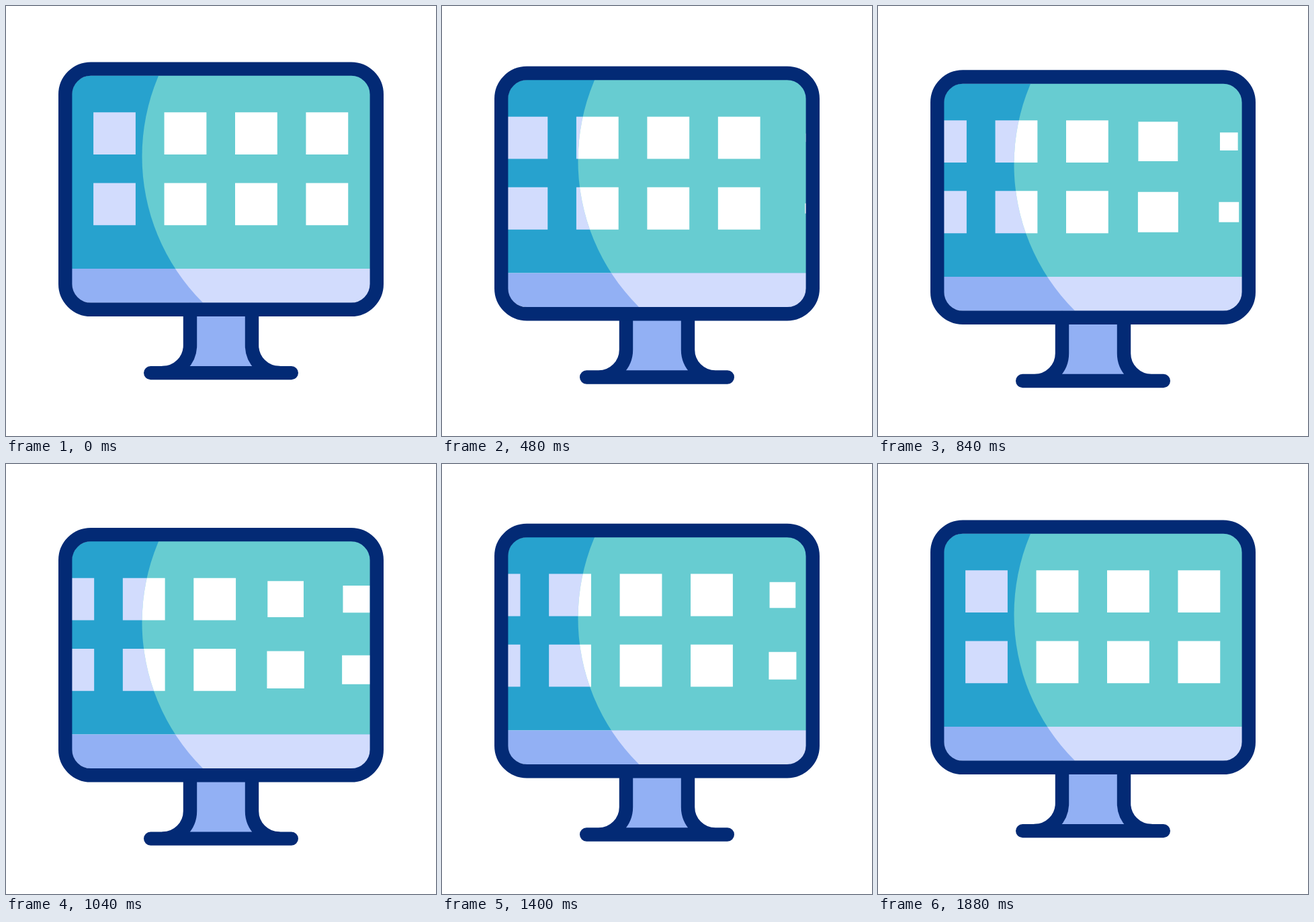
Recreate the animation shown at these times as an HTML page. Size 640 px wide and 640 px high, loop 2 s.

```html
<!DOCTYPE html>
<html lang="en">
<head>
<meta charset="utf-8">
<title>Scrolling monitor</title>
<style>
  html, body { margin: 0; width: 100%; height: 100%; overflow: hidden; background: #fff; }
  svg { display: block; width: 100%; height: 100%; }
</style>
</head>
<body>
<svg viewBox="0 0 640 640">
  <defs>
    <clipPath id="screen"><rect x="98" y="103.5" width="444" height="338.3" rx="28"/></clipPath>
    <clipPath id="shine"><circle cx="509" cy="224" r="306.5"/></clipPath>
    <path id="tiles"/>
  </defs>
  <g id="monitor">
    <path fill="#92b0f4" d="M274 452V505Q274 530 262 546H378Q366 530 366 505V452Z"/>
    <path fill="none" stroke="#032a75" stroke-width="20.4" stroke-linecap="round"
      d="M274 452V505a41 41 0 0 1-41 41M366 452V505a41 41 0 0 0 41 41M215.2 546.1H424.8"/>
    <g clip-path="url(#screen)">
      <path fill="#27a2ce" d="M90 95H550V391H90Z"/>
      <path fill="#92b0f4" d="M90 391H550V450H90Z"/>
      <use href="#tiles" fill="#d2dcfd"/>
      <g clip-path="url(#shine)">
        <path fill="#67ccd1" d="M90 95H550V391H90Z"/>
        <path fill="#d2dcfd" d="M90 391H550V450H90Z"/>
        <use href="#tiles" fill="#fff"/>
      </g>
    </g>
    <rect x="88.2" y="93.6" width="463.6" height="358.2" rx="38" fill="none" stroke="#032a75" stroke-width="20.4"/>
  </g>
</svg>
<script>
const LOOP = 2000, STEP = 40, SIZE = 62.8, PITCH = 105.45;
const monitor = document.getElementById('monitor');
const tiles = document.getElementById('tiles');
// start and end of growth for each column that enters from the right
const growth = [[230, 990], [470, 1270], [560, 1400], [827, 1852]];

// symmetric cubic-bezier(a, 0, 1 - a, 1) between two times
function ease(t, from, to, a = 0.5) {
  const p = Math.min(1, Math.max(0, (t - from) / (to - from)));
  let lo = 0, hi = 1;
  for (let i = 0; i < 24; i++) {
    const s = (lo + hi) / 2, r = 1 - s;
    if (3 * a * s * r * r + 3 * (1 - a) * s * s * r + s ** 3 < p) lo = s; else hi = s;
  }
  return lo * lo * (3 - 2 * lo);
}

function square(cx, cy, size) {
  return `M${cx - size / 2} ${cy - size / 2}h${size}v${size}h${-size}z`;
}

function draw(t) {
  const drop = 12 * (t < 880 ? ease(t, 50, 880) : 1 - ease(t, 880, 1870));
  const scroll = 4 * PITCH * ease(t, 80, 1766, 0.54);
  let d = '';
  for (let col = 0; col < 8; col++) {
    for (let row = 0; row < 2; row++) {
      const scale = col < 4 ? 1 : ease(t + row * 20, ...growth[col - 4]);
      d += square(161.5 + col * PITCH - scroll, 189.6 + row * 105.2, SIZE * scale);
    }
  }
  tiles.setAttribute('d', d);
  monitor.setAttribute('transform', `translate(0 ${drop})`);
}

const start = performance.now();
function tick() {
  const t = (performance.now() - start) % LOOP;
  draw(Math.floor(t / STEP) * STEP);
  requestAnimationFrame(tick);
}
tick();
</script>
</body>
</html>
```
